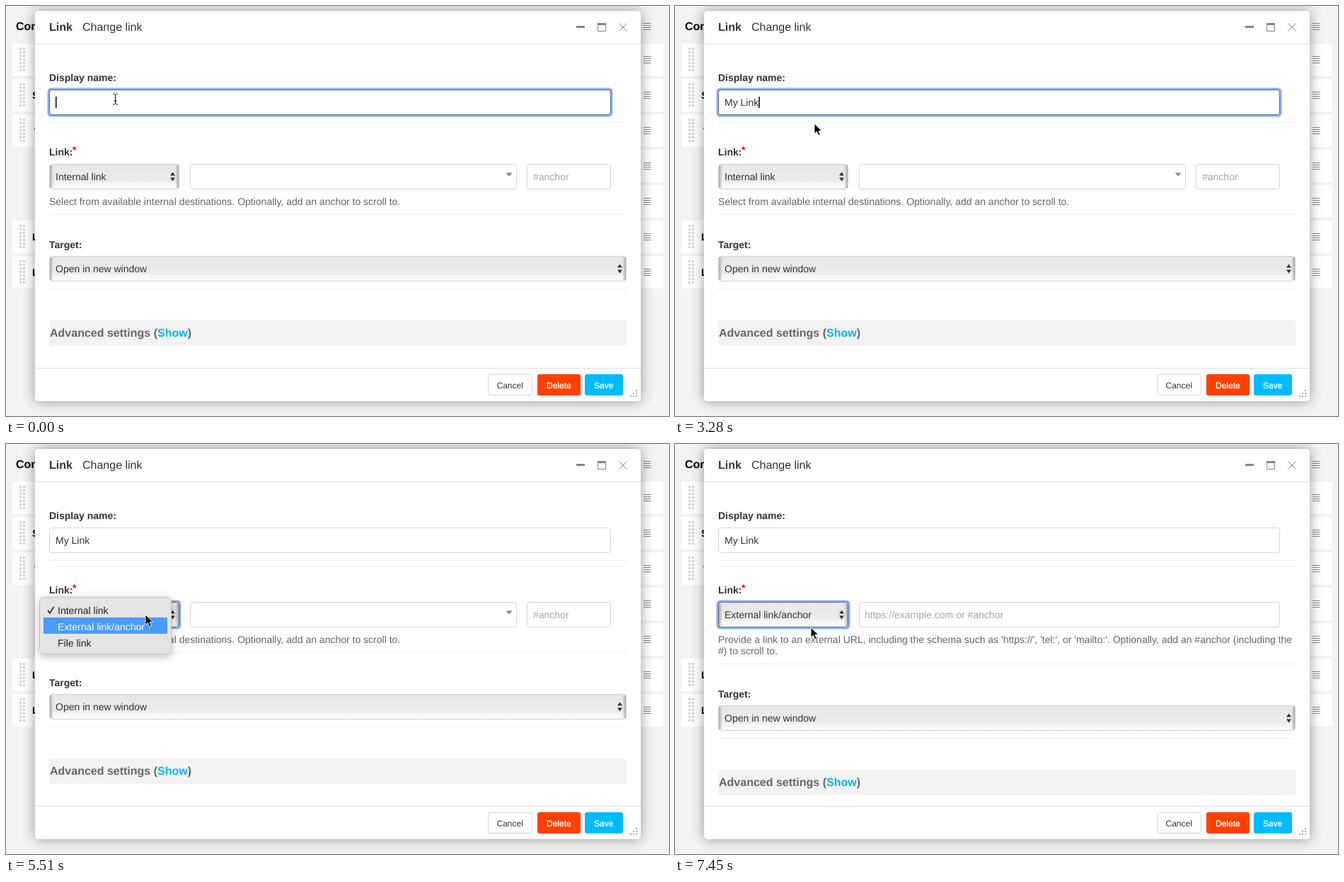
Animation, 937 px wide and 579 px high, one loop 8 s. Source, as an HTML page:

```html
<!DOCTYPE html>
<html lang="en">
<head>
<meta charset="utf-8">
<title>Change link</title>
<style>
  html, body { margin: 0; width: 100%; height: 100%; overflow: hidden; background: #f3f3f3; }
  svg { display: block; width: 937px; height: 579px; }
  text { font: 14px "Liberation Sans", Arial, sans-serif; fill: #333; white-space: pre; text-rendering: geometricPrecision; }
  .bold { font-weight: bold; }
  .big { font-size: 16px; }
  .small { font-size: 12px; }
  .help { fill: #666; }
  .hint { fill: #a6a6a6; }
  .light { fill: #fff; stroke: #fff; stroke-width: .3; }
  .field { fill: #fff; stroke: #d5d5d5; }
  .ring { fill: none; stroke: #8ab1fa; stroke-width: 3; }
  .focus { fill: none; stroke: #56688f; }
  .rule { stroke: #f0f0f0; }
  .icon { fill: none; stroke: #858585; }
</style>
</head>
<body>
<svg viewBox="0 0 937 579">
  <defs>
    <linearGradient id="face" x2="0" y2="1">
      <stop stop-color="#e7e7e7"/>
      <stop offset=".7" stop-color="#ececec"/>
      <stop offset=".76" stop-color="#f5f5f5"/>
      <stop offset="1" stop-color="#fbfbfb"/>
    </linearGradient>
    <linearGradient id="edge">
      <stop stop-color="#888" stop-opacity=".65"/>
      <stop offset="1" stop-color="#888" stop-opacity="0"/>
    </linearGradient>
    <pattern id="grip" x="19" y="59" width="5" height="5" patternUnits="userSpaceOnUse">
      <rect width="3" height="3" fill="#d2d2d2"/>
    </pattern>
    <filter id="glow" x="-10%" y="-10%" width="120%" height="120%">
      <feDropShadow dx="0" dy="0" stdDeviation="9" flood-opacity=".4"/>
    </filter>
    <filter id="lift" x="-20%" y="-30%" width="140%" height="170%">
      <feDropShadow dx="0" dy="3" stdDeviation="6" flood-opacity=".25"/>
    </filter>
    <path id="arrows" d="M-3.5 -1.5L0 -6.5L3.5 -1.5zM-3.5 1.5L0 6.5L3.5 1.5z" fill="#333"/>
    <path id="bars" d="M901 -4.5h10.5m-10.5 3h10.5m-10.5 3h10.5m-10.5 3h10.5" stroke="#888"/>
  </defs>

  <rect width="937" height="579" fill="#f3f3f3"/>
  <g id="rows"></g>
  <text class="bold big" x="14" y="34" style="fill:#000">Con</text>
  <text class="bold" x="37" y="131" style="fill:#000">S</text>
  <text class="bold" x="37" y="331" style="fill:#000">L</text>
  <text class="bold" x="37" y="381" style="fill:#000">L</text>
  <path d="M39 172h2v3z" fill="#888"/>

  <rect x="41" y="7" width="856" height="551" rx="5" fill="#fefefe" filter="url(#glow)"/>
  <path d="M41 53.5H897M41 511.5H897" stroke="#ddd"/>
  <text class="bold big" x="61" y="35">Link</text>
  <text class="big" x="108" y="35">Change link</text>
  <path class="icon" stroke-width="3" d="M806 29.5h12M836 25.5h12"/>
  <path class="icon" d="M836.5 25.5h11v10h-11zM866.5 24.5l11 11m0 -11l-11 11"/>

  <text class="bold" x="61" y="106">Display name:</text>
  <rect class="field" x="61.5" y="118.5" width="793" height="35" rx="3"/>
  <g id="nameFocus">
    <rect class="ring" x="60" y="117" width="796" height="38" rx="4"/>
    <rect class="focus" x="61.5" y="118.5" width="793" height="35" rx="3"/>
    <rect id="caret" y="128" width="1.5" height="16"/>
  </g>
  <text id="name" x="70" y="141"></text>
  <path class="rule" d="M61 164.5H877"/>

  <text class="bold" x="61" y="211">Link:</text>
  <text class="bold" x="94" y="208" style="fill:#e00000">*</text>
  <g id="typeSelect"></g>
  <g id="typeFocus">
    <rect class="ring" x="60" y="222" width="186" height="38" rx="4"/>
    <rect class="focus" x="61.5" y="223.5" width="183" height="35" rx="3"/>
  </g>
  <text id="type" x="70" y="245.5"></text>

  <g id="internal">
    <rect class="field" x="260.5" y="223.5" width="461" height="35" rx="3"/>
    <path d="M706.5 235.5h9l-4.5 5z" fill="#888"/>
    <rect class="field" x="736.5" y="223.5" width="118" height="35" rx="3"/>
    <text class="hint" x="745" y="246">#anchor</text>
    <text class="help" x="61" y="281">Select from available internal destinations. Optionally, add an anchor to scroll to.</text>
  </g>
  <g id="external">
    <rect class="field" x="260.5" y="223.5" width="594" height="35" rx="3"/>
    <text class="hint" x="268" y="246">https://example.com or #anchor</text>
    <text class="help" x="61" y="281">Provide a link to an external URL, including the schema such as 'https://', 'tel:', or 'mailto:'. Optionally, add an #anchor (including the</text>
    <text class="help" x="61" y="297">#) to scroll to.</text>
  </g>

  <g id="lower">
    <path class="rule" d="M61 294.5H877M61 399.5H877"/>
    <text class="bold" x="61" y="341.5">Target:</text>
    <g id="targetSelect"></g>
    <text x="70" y="375.5">Open in new window</text>
    <rect x="61" y="444" width="816" height="36" rx="3" fill="#f2f2f2"/>
    <text class="bold big help" x="62" y="467">Advanced settings (<tspan fill="#00b4f5">Show</tspan>)</text>
  </g>

  <rect class="field" x="681.5" y="520.5" width="62" height="29" rx="3"/>
  <rect x="751" y="520" width="61" height="30" rx="3" fill="#ff4000"/>
  <rect x="818" y="520" width="54" height="30" rx="3" fill="#00bbff"/>
  <text class="small" x="693.5" y="540">Cancel</text>
  <text class="small light" x="764" y="540">Delete</text>
  <text class="small light" x="831" y="540">Save</text>
  <path d="M890 543h2M886 547h2m2 0h2M882 551h2m2 0h2m2 0h2" stroke="#aaa" stroke-width="2"/>

  <g id="menu">
    <rect x="47.5" y="216.5" width="186" height="80" rx="6" fill="#e4e4e2" stroke="#c4c4c4" filter="url(#lift)"/>
    <rect id="highlight" x="53" width="175" height="23" fill="#4b9bfd"/>
    <path id="check" d="M59 235l3 4 5.5 -9" fill="none" stroke-width="1.6"/>
    <text x="73" y="240">Internal link</text>
    <text x="73" y="263">External link/anchor</text>
    <text x="73" y="286">File link</text>
  </g>

  <g id="beam" fill="none">
    <path d="M-3.5 -7.5q3 0 3.5 1.5q.5 -1.5 3.5 -1.5M-3.5 7.5q3 0 3.5 -1.5q.5 1.5 3.5 1.5M0 -6V6M-2 2.5h4" stroke="#fff" stroke-width="2.4"/>
    <path d="M-3.5 -7.5q3 0 3.5 1.5q.5 -1.5 3.5 -1.5M-3.5 7.5q3 0 3.5 -1.5q.5 1.5 3.5 1.5M0 -6V6M-2 2.5h4" stroke="#000"/>
  </g>
  <path id="arrow" d="M.5 .5v14.5l3.4 -3.2 2.4 5.5 2.5 -1.1 -2.4 -5.3h4.7z" stroke="#fff" stroke-width=".9"/>
</svg>
<script>
const LOOP = 8000;
const OPEN = 4320, CLOSING = 7300, CHOSEN = 7450;
const $ = id => document.getElementById(id);

// [time, text, caret opacity]
const typing = [
  [0, '', 1], [150, '', .5], [300, '', 0], [440, '', .5], [590, '', 1],
  [1190, 'M', 1], [1340, 'My', 1], [1490, 'My ', 1],
  [2090, 'My ', .4], [2240, 'My L', 1], [2390, 'My Li', 1], [2690, 'My Link', 1],
  [3290, 'My Link', .5], [3430, 'My Link', 0], [3580, 'My Link', .5], [3730, 'My Link', 1]
];

// [time, x, y]
const pointer = [
  [0, 154, 131], [2990, 163, 138], [3140, 196, 165], [3290, 232, 203],
  [3430, 245, 230], [3580, 232, 243], [3730, 207, 246], [3880, 197, 246],
  [5070, 198, 234], [5220, 198, 217], [5370, 197, 222], [5510, 196, 240],
  [5660, 195, 258], [5810, 193, 267], [5960, 191, 262], [6100, 191, 258]
];

const at = (steps, t) => steps.findLast(step => step[0] <= t);
const show = (id, on) => $(id).style.display = on ? '' : 'none';

function drawRows() {
  let markup = '<use href="#bars" y="29"/>';
  for (let i = 0; i < 7; i++) {
    const y = 53 + 50 * i, nested = i === 3 || i === 4;
    const x = nested ? 45 : 9;
    markup += `<rect x="${x}" y="${y}" width="${929 - x}" height="46" rx="2" fill="#fff"/>`;
    if (!nested) markup += `<rect x="19" y="${y + 6}" width="8" height="35" fill="url(#grip)"/>`;
    markup += `<use href="#bars" y="${y + 23}"/>`;
  }
  $('rows').innerHTML = markup;
}

function drawSelect(id, y, width) {
  const right = 61 + width;
  $(id).innerHTML = `
    <rect x="61.5" y="${y + .5}" width="${width - 1}" height="35" rx="4" fill="url(#face)" stroke="#d0d0d0"/>
    <rect x="62" y="${y + 2}" width="5" height="32" fill="url(#edge)"/>
    <rect width="5" height="32" fill="url(#edge)" transform="translate(${right - 1} ${y + 2}) scale(-1 1)"/>
    <use href="#arrows" x="${right - 9.5}" y="${y + 18}"/>`;
}

function render(t) {
  const [, text, caret] = at(typing, t);
  const [, x, y] = at(pointer, t);
  const chosen = t >= CHOSEN;

  $('name').textContent = text;
  $('caret').setAttribute('x', 70 + (text ? $('name').getComputedTextLength() : 0));
  $('caret').setAttribute('opacity', caret);
  show('nameFocus', t < OPEN);
  show('typeFocus', t >= OPEN);

  $('type').textContent = chosen ? 'External link/anchor' : 'Internal link';
  show('internal', !chosen);
  show('external', chosen);
  $('lower').setAttribute('transform', `translate(0 ${chosen ? 16 : 0})`);

  show('menu', t >= OPEN && !chosen);
  $('menu').setAttribute('opacity', t < CLOSING ? 1 : .08);
  const active = t < 5510 ? 0 : 1;
  $('highlight').setAttribute('y', 222 + 23 * active);
  $('menu').querySelectorAll('text').forEach((item, i) => item.style.fill = i === active ? '#fff' : '#222');
  $('check').setAttribute('stroke', active ? '#222' : '#fff');

  const overField = y < 154;
  show('beam', overField);
  show('arrow', !overField);
  $(overField ? 'beam' : 'arrow').setAttribute('transform', `translate(${x + .5} ${y + .5})`);
}

function frame() {
  render(performance.now() % LOOP);
  requestAnimationFrame(frame);
}

drawRows();
drawSelect('typeSelect', 223, 184);
drawSelect('targetSelect', 353, 816);
frame();
</script>
</body>
</html>
```
